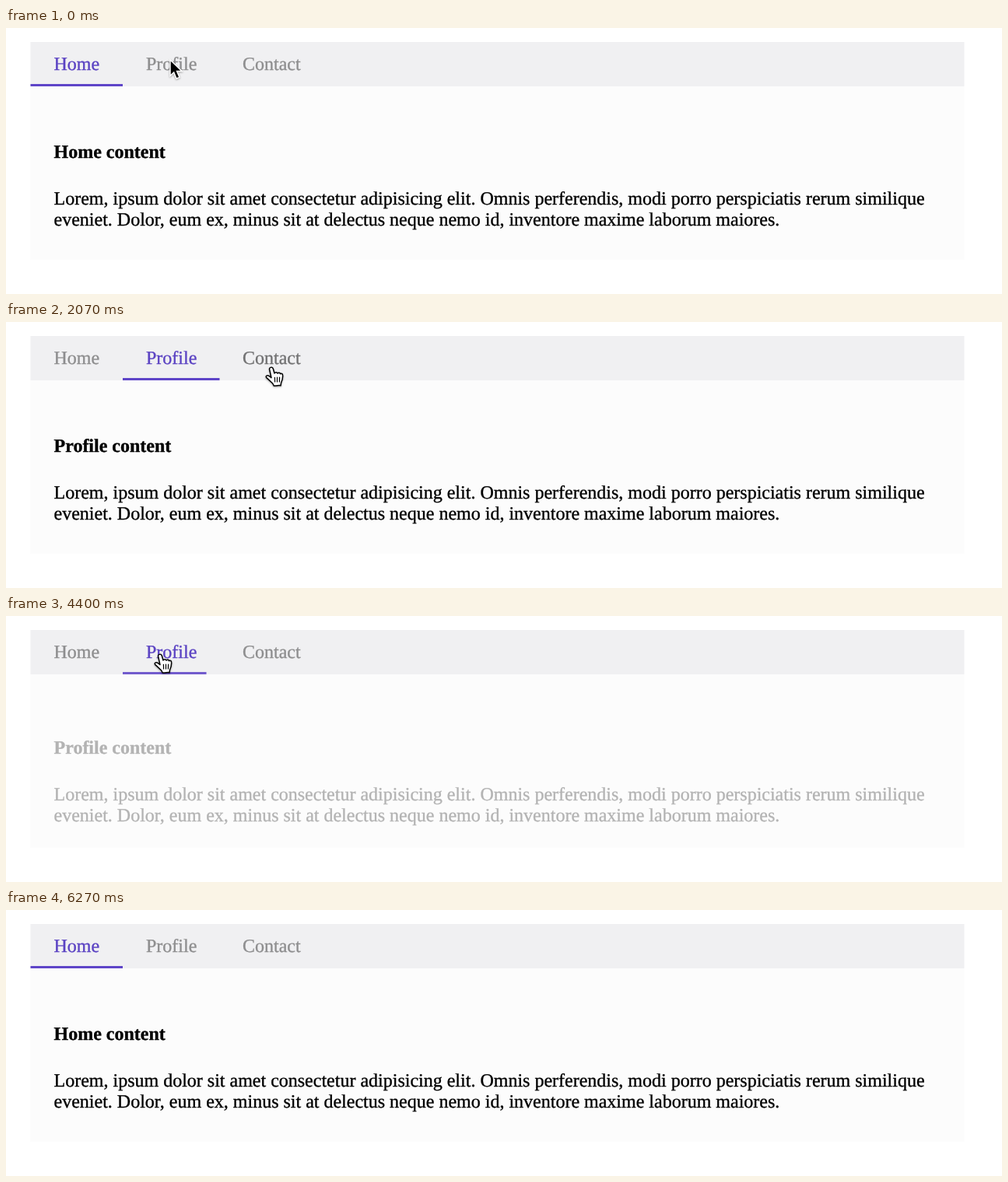
Animation, 1280 px wide and 342 px high, one loop 6.74 s. Source, as an HTML page:

```html
<!DOCTYPE html>
<html lang="en">
<head>
<meta charset="utf-8">
<title>Tabs</title>
<style>
  html, body { margin: 0; width: 100%; height: 100%; overflow: hidden; background: #fff; }
  svg { display: block; font: 24px "Liberation Serif", "Times New Roman", serif; }
  text {
    fill: currentColor; stroke: currentColor; stroke-width: .35px;
    text-rendering: geometricPrecision; font-variant-ligatures: common-ligatures;
  }
  #cursor { filter: drop-shadow(0 1.5px 1.2px rgba(0, 0, 0, .35)); }
</style>
</head>
<body>
<svg width="1280" height="342" viewBox="0 0 1280 342">
  <rect x="31.5" y="18" width="1200" height="57" fill="#f0f0f2"/>
  <rect x="31.5" y="75" width="1200" height="223" fill="#fcfcfc"/>
  <g id="tabs">
    <text x="61.5" y="54">Home</text>
    <text x="180" y="54">Profile</text>
    <text x="304" y="54">Contact</text>
  </g>
  <rect id="bar" y="72" height="3" fill="#5e45c8"/>
  <g id="content">
    <text id="title" x="61.5" y="166.6" font-weight="bold"></text>
    <text x="61.5" y="226.6">Lorem, ipsum dolor sit amet consectetur adipisicing elit. Omnis perferendis, modi porro perspiciatis rerum similique</text>
    <text x="61.5" y="253.6">eveniet. Dolor, eum ex, minus sit at delectus neque nemo id, inventore maxime laborum maiores.</text>
  </g>
  <g id="cursor">
    <path id="arrow" d="M0 0V20.5L4.7 16L8 24L12 22.4L8.6 14.5H15Z" stroke="#fff" stroke-width="1.5"/>
    <g id="hand" stroke="#000" stroke-width="1.5" stroke-linejoin="round" stroke-linecap="round">
      <path fill="#fff" d="M-.4 3C-1 .3 3-.9 4.2 1.8L6 8C6.8 6.4 9.4 6.4 10 8C11 6.8 13 7 13.6 8.7C15 7.7 16.5 8.6 16.6 10.4C16.9 14 16.4 16.5 14.6 20L14 23.8C11.5 22.6 9.5 24.4 5.2 24L4 21.5C1 18.5-.5 16.8-4.2 13.6C-6 11.4-3.2 9.8-1 11.4L2 13.6Z"/>
      <path fill="none" stroke-width="1.2" d="M6.4 13.3L6.6 19M9.5 13.2V19M12.6 13.2L12.4 19"/>
    </g>
  </g>
</svg>
<script>
const LOOP = 6740, FADE = 600, SLIDE = 300, HOVER = 200;
const $ = id => document.getElementById(id);
const labels = [...$("tabs").children];
const edges = [31.5, 150, 274.5, 409.5];

// [time, tab]
const clicks = [[-LOOP, 0], [1240, 1], [2900, 2], [4230, 1], [5562, 0]];
// [time, x, y] of the pointer's hot spot
const moves = [
  [0, 211, 41], [700, 211, 41], [1270, 217, 47], [1420, 217, 47], [2070, 339, 58],
  [3150, 339, 58], [3530, 252, 57], [4200, 196, 49], [4930, 196, 49],
  [5340, 106, 52], [5670, 104, 52], [5800, 104, 52], [6130, 128, 1], [6230, 134, -28]
];

const clamp = v => Math.min(1, Math.max(0, v));
const smooth = v => v * v * (3 - 2 * v);

// CSS "ease": cubic-bezier(.25, .1, .25, 1)
function ease(x) {
  let lo = 0, hi = 1, s;
  for (let i = 0; i < 20; i++) {
    s = (lo + hi) / 2;
    if (.75 * s * (1 - s) ** 2 + .75 * s * s * (1 - s) + s ** 3 < x) lo = s; else hi = s;
  }
  return .3 * s * (1 - s) ** 2 + 3 * s * s * (1 - s) + s ** 3;
}

function pointer(t) {
  const i = moves.findIndex(m => m[0] > t);
  if (i < 0) return [134, -60];
  if (!i) return [211, 41];
  const [t0, x0, y0] = moves[i - 1], [t1, x1, y1] = moves[i];
  const k = smooth((t - t0) / (t1 - t0));
  return [x0 + (x1 - x0) * k, y0 + (y1 - y0) * k];
}

function hovered(t) {
  const [x, y] = pointer(t);
  if (t < 725 || y < 18 || y > 75) return -1;
  return edges.findIndex((e, i) => x >= e && x < edges[i + 1]);
}

// Share of the recent past spent over a tab
function hoverLevel(tab, t) {
  let n = 0;
  for (let i = 0; i < 10; i++) n += hovered(t - i * HOVER / 10) === tab;
  return n / 10;
}

function draw(t) {
  const [start, tab] = clicks.filter(c => c[0] <= t).pop();
  labels.forEach((label, i) => {
    const grey = 142 - 28 * hoverLevel(i, t);
    label.style.color = i === tab ? "#5b43c3" : `rgb(${grey},${grey},${grey + 1})`;
  });

  const slide = ease(clamp((t - start) / SLIDE));
  $("bar").setAttribute("x", edges[tab]);
  $("bar").setAttribute("width", (edges[tab + 1] - edges[tab]) * slide);
  $("bar").setAttribute("opacity", slide);

  const fade = clamp((t - start) / FADE);
  $("title").textContent = labels[tab].textContent + " content";
  $("content").setAttribute("opacity", fade);
  $("content").setAttribute("transform", `translate(0 ${15 * (1 - fade)})`);

  const over = hovered(t) >= 0;
  $("hand").style.display = over ? "" : "none";
  $("arrow").style.display = over ? "none" : "";
  $("cursor").setAttribute("transform", `translate(${pointer(t).map(Math.round)})`);
}

const begin = performance.now();
function tick() {
  draw((performance.now() - begin) % LOOP);
  requestAnimationFrame(tick);
}
tick();
</script>
</body>
</html>
```
